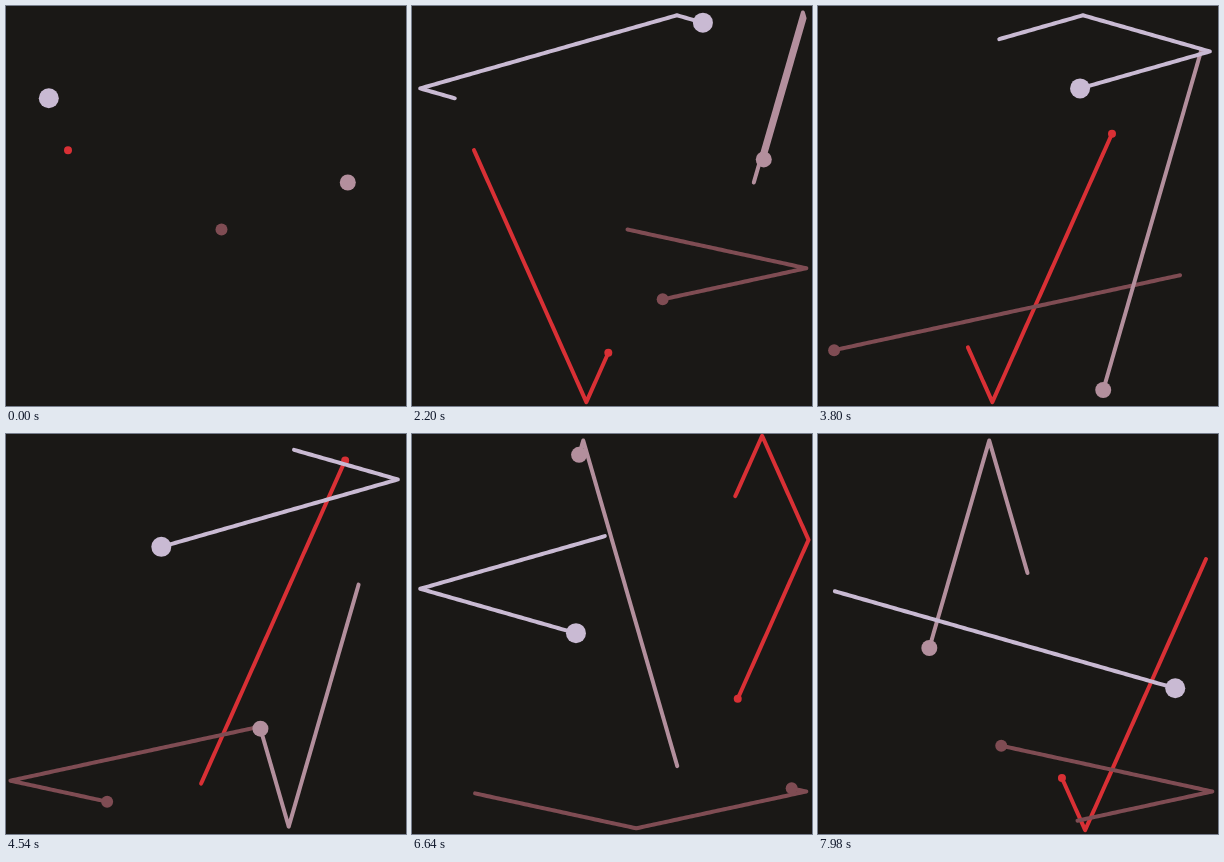
An HTML page with a canvas for the animation above (8 s loop, 400x400 px).

```html
<!DOCTYPE html>
<html lang="en">
<head>
<meta charset="utf-8">
<title>Bouncing dots</title>
<style>
  html, body { margin: 0; width: 100%; height: 100%; overflow: hidden; background: #1a1816; }
  canvas { display: block; width: 100%; height: 100%; }
</style>
</head>
<body>
<canvas id="stage" width="400" height="400"></canvas>
<script>
const SIZE = 400, STEPS = 400, STEP_MS = 20, TRAIL = 118;
const ctx = document.getElementById('stage').getContext('2d');

// Drawn from the smallest dot to the largest.
const dots = [
  { r: 4, color: '#d93035', x: 62, y: 144.2, vx: 1.221, vy: 2.738 },
  { r: 6, color: '#7f4c53', x: 215.5, y: 223.5, vx: 2.932, vy: 0.635 },
  { r: 8, color: '#b38f9d', x: 341.8, y: 176.5, vx: 0.832, vy: -2.8823 },
  { r: 10, color: '#c9bad3', x: 42.8, y: 92.3, vx: -2.885, vy: -0.822 }
];

// Positions at every step; a dot turns back after it crosses a wall.
function tracePath({ r, x, y, vx, vy }) {
  const outside = v => v < r || v > SIZE - r;
  const path = [];
  for (let i = 0; i < STEPS; i++) {
    path.push([x, y]);
    x += vx;
    y += vy;
    if (outside(x)) vx = -vx;
    if (outside(y)) vy = -vy;
  }
  return path;
}

for (const dot of dots) dot.path = tracePath(dot);

function drawDot({ r, color, path }, step) {
  ctx.strokeStyle = ctx.fillStyle = color;
  if (step > 0) {
    ctx.beginPath();
    for (let i = Math.max(0, step - TRAIL); i <= step; i++) ctx.lineTo(...path[i]);
    ctx.stroke();
  }
  ctx.beginPath();
  ctx.arc(...path[step], r, 0, Math.PI * 2);
  ctx.fill();
}

ctx.lineWidth = 4;
ctx.lineCap = ctx.lineJoin = 'round';

function render(now) {
  const step = Math.floor(now / STEP_MS) % STEPS;
  ctx.fillStyle = '#1a1816';
  ctx.fillRect(0, 0, SIZE, SIZE);
  for (const dot of dots) drawDot(dot, step);
}

let start;
function tick(now) {
  start ??= now;
  render(now - start);
  requestAnimationFrame(tick);
}
render(0);
requestAnimationFrame(tick);
</script>
</body>
</html>
```
